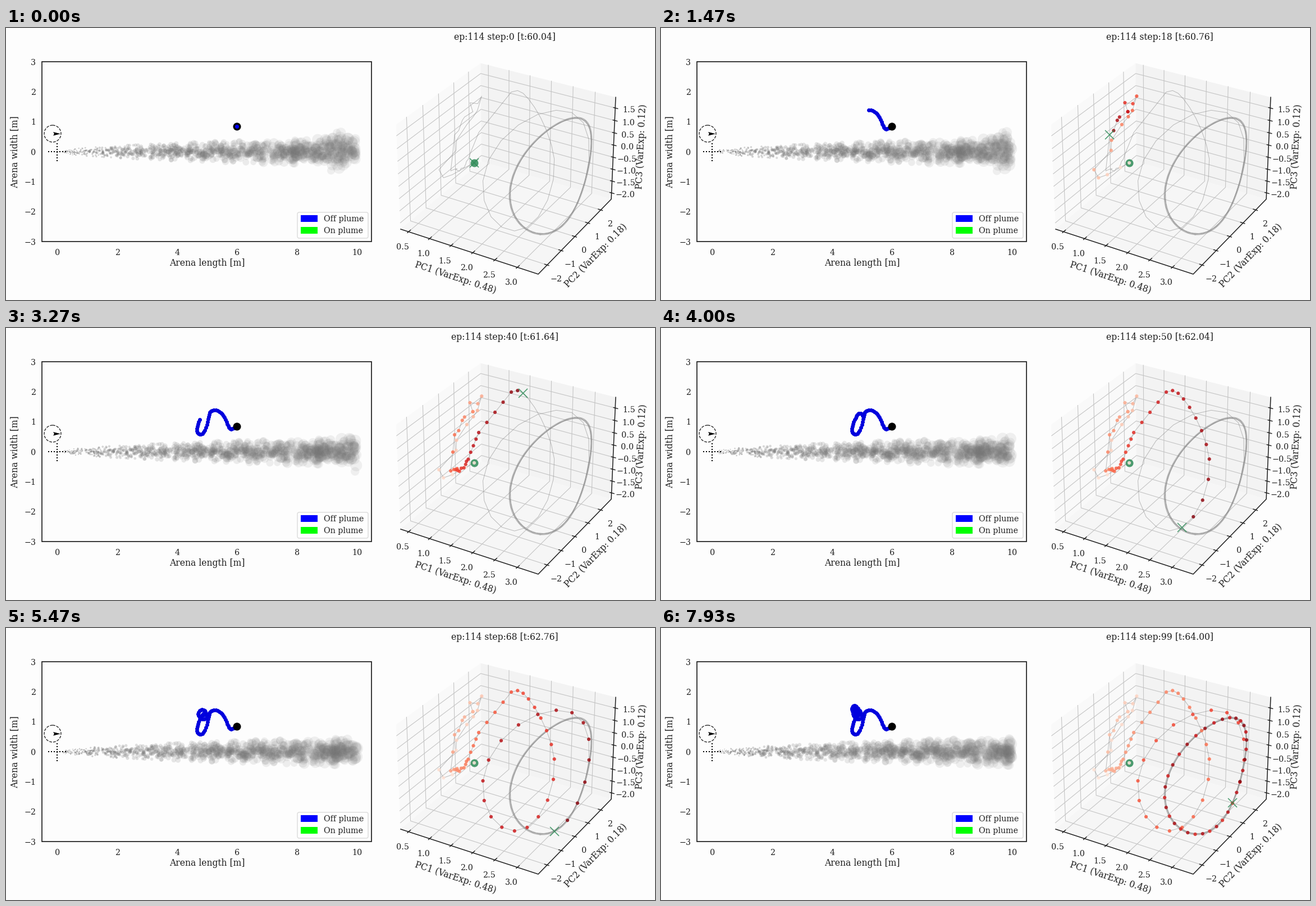
These frames come from a looping animation (1156 px wide and 484 px high, 8000 ms). A matplotlib script:

```python
import numpy as np
import matplotlib.pyplot as plt
from matplotlib.animation import FuncAnimation
from matplotlib.patches import Circle, FancyBboxPatch, Polygon, Rectangle

W, H, DPI = 1156, 484, 64
STEPS, LOOP_MS = 100, 8000
PX = 72 / DPI  # points per pixel
INK, BG, GREEN = "#1c1c1c", "#fdfdfd", "#2e8b57"
TICK, LABEL = 14.2, 15.6

plt.rcParams["font.family"] = "DejaVu Serif"
fig = plt.figure(figsize=(W / DPI, H / DPI), dpi=DPI, facecolor=BG)
ax = fig.add_axes([0, 0, 1, 1])
ax.set_xlim(0, W)
ax.set_ylim(H, 0)
ax.axis("off")


def text(x, y, s, size=TICK, **kw):
    kw = {"ha": "center", "va": "baseline", "color": INK, **kw}
    return ax.text(x, y, s, fontsize=size * PX, **kw)


def line(pts, color=INK, width=1.0, **kw):
    return ax.plot(*np.transpose(pts), color=color, lw=width * PX, **kw)[0]


def area(radius):
    return (2 * np.asarray(radius) * PX) ** 2


def dots(pts, radius, color, **kw):
    x, y = np.transpose(pts) if len(pts) else ([], [])
    return ax.scatter(x, y, s=area(radius), c=color, linewidths=0, **kw)


def ease(t, start, end):
    u = np.clip((t - start) / (end - start), 0, 1)
    return u * u * (3 - 2 * u)


def spline(knots, t):
    """Natural cubic spline through evenly spaced knots."""
    p = np.array(knots, float)
    n = len(p)
    a = 4 * np.eye(n - 2) + np.eye(n - 2, k=1) + np.eye(n - 2, k=-1)
    m = np.zeros_like(p)
    m[1:-1] = np.linalg.solve(a, 6 * (p[2:] - 2 * p[1:-1] + p[:-2]))
    i = np.clip(np.floor(t).astype(int), 0, n - 2)
    f = (t - i)[:, None]
    g = 1 - f
    return g * p[i] + f * p[i + 1] + ((g**3 - g) * m[i] + (f**3 - f) * m[i + 1]) / 6


def signed(v, fmt="{:.1f}"):
    return fmt.format(v).replace("-", "\u2212")


# ---- arena ----
UNIT, X0, Y0 = 53.33, 91.0, 220.3


def draw_arena():
    ax.add_patch(Rectangle((64.3, 60.3), 11 * UNIT, 6 * UNIT, fill=False, ec=INK,
                           lw=1.7 * PX, zorder=6))
    for v in range(0, 11, 2):
        text(X0 + 0.7 + v * UNIT, 404, str(v))
    for v in range(-3, 4):
        text(53, Y0 + 5.5 - v * UNIT, signed(v, "{}"), ha="right")
    text(358, 423, "Arena length [m]", LABEL)
    text(16, 221, "Arena width [m]", LABEL, va="center", rotation=90)

    # wind gauge and odour source
    ax.add_patch(Circle((83, 188), 15, fill=False, ec=INK, lw=1.3 * PX,
                        ls=(0, (3.7, 1.6)), zorder=5))
    ax.add_patch(Polygon([(84, 185), (97, 188.3), (84, 191.6), (86, 188.3)],
                         fc="black", lw=0, zorder=5))
    k = 4.9 * np.arange(-3, 4)
    for x, y in ((X0 + k, Y0 + 0 * k), (X0 + 0 * k, Y0 + 0.7 + k)):
        dots(np.c_[x, y], 1.2, "black", marker="s", zorder=5)

    ax.add_patch(FancyBboxPatch((522, 331), 120, 40, fc="white", ec="#cccccc",
                                boxstyle="round,pad=3,rounding_size=3",
                                lw=1.2 * PX, alpha=0.8, zorder=7))
    for y, color, name in ((333, "blue", "Off plume"), (354, "lime", "On plume")):
        ax.add_patch(Rectangle((525, y), 30, 12, fc=color, lw=0, zorder=8))
        text(566, y + 11, name, ha="left", zorder=8)


# ---- 3D box, one perspective camera over the unit cube ----
ORIGIN = np.array([703, 358, 1])
AXES = np.array([0.9477 * np.array([948, 438, 1]),
                 1.0895 * np.array([847, 237.5, 1]),
                 0.9586 * np.array([695, 172, 1])]) - ORIGIN


def project(*p):
    h = ORIGIN + np.array(p) @ AXES
    return h[:2] / h[2]


def poly(*corners):
    return [project(*c) for c in corners]


def draw_box():
    panes = (("#f9f9f9", poly((0, 0, 0), (0, 1, 0), (0, 1, 1), (0, 0, 1))),
             ("#f3f3f3", poly((0, 1, 0), (1, 1, 0), (1, 1, 1), (0, 1, 1))),
             ("#f6f6f6", poly((0, 0, 0), (1, 0, 0), (1, 1, 0), (0, 1, 0))))
    for color, pts in panes:
        ax.add_patch(Polygon(pts, fc=color, lw=0, zorder=0))

    def grid(*corners):
        line(poly(*corners), "#c4c4c4", 1.1, zorder=1)

    def tick(p, inner, outer):
        line([p + inner, p + outer], INK, 1.4, zorder=3)

    for k in range(6):
        u = 0.060 + 0.159 * k
        grid((u, 0, 0), (u, 1, 0), (u, 1, 1))
        p = project(u, 0, 0)
        tick(p, (3.5, -3), (-2, 1.7))
        text(p[0] - 10.5, p[1] + 31.5, f"{0.5 + 0.5 * k:.1f}")
    for k in range(5):
        v = 0.113 + 0.183 * k
        grid((1, v, 0), (0, v, 0), (0, v, 1))
        p = project(1, v, 0)
        tick(p, (-4.5, -1.4), (3, 1))
        text(p[0] + 16, p[1] + 29, signed(k - 2, "{}"))
    for k in range(8):
        w = 0.0635 + 0.1193 * k
        grid((0, 0, w), (0, 1, w), (1, 1, w))
        p = project(1, 1, w)
        tick(p, (-3, -0.8), (4.5, 1.2))
        text(p[0] + 24.5, p[1] + 8, signed(-2 + 0.5 * k))

    line(poly((0, 0, 0), (1, 0, 0), (1, 1, 0), (1, 1, 1)), INK, 1.5, zorder=3)
    for x, y, angle, s in ((800.5, 444, -18.1, "PC1 (VarExp: 0.48)"),
                           (1051, 405.5, 45.6, "PC2 (VarExp: 0.18)"),
                           (1132, 211, 87.4, "PC3 (VarExp: 0.12)")):
        text(x, y, s, LABEL, va="center", rotation=angle, rotation_mode="anchor")


# ---- trajectories, one point per step ----
def walk_path():
    """A meander, then shrinking loops whose centre drifts up and left."""
    knots = [(411, 175), (399, 179), (391, 163), (380, 149), (365, 148), (359, 167),
             (350, 188), (340, 183), (345, 163), (352, 152), (359, 154)]
    meander = spline(knots, np.arange(49) / 5)
    q = np.arange(STEPS - 49)
    angle = -0.4 + 2 * np.pi * q / 15.8
    r = 8 - 0.08 * q
    loops = np.c_[351 - 0.15 * q + r * np.cos(angle), 156 - 0.3 * q + r * np.sin(angle)]
    return np.vstack([meander, loops])


def orbit(phase, cx=977, cy=263.3, ry=103.7):
    c, s = np.cos(phase), np.sin(phase)
    x = cx - 33.7 * c - 63.9 * s + 8.2 * np.cos(2 * phase) - 3.2 * np.sin(2 * phase)
    return np.c_[x, cy + ry * c - 5.1 * s]


def state_path(rng):
    """A jittery start, a spiral outwards, then a steady limit cycle."""
    keys = np.array([(0, 834, 240), (3, 782, 271), (4, 780, 258), (6, 808, 192),
                     (10, 842, 122), (15, 824, 152), (18, 799, 190), (20, 797, 250),
                     (25, 808, 256), (30, 823, 233), (34, 842, 186), (38, 900, 114)])
    s = np.arange(39)
    start = np.c_[np.interp(s, keys[:, 0], keys[:, 1]),
                  np.interp(s, keys[:, 0], keys[:, 2])]
    wobble = 6 * (1 - ease(s, 14, 24)) + 2 * (1 - ease(s, 26, 32))
    wobble[[0, 18]] = 0
    start += rng.uniform(-1.2, 1.2, start.shape) * wobble[:, None]

    s = np.arange(39, STEPS)
    turns = np.interp(s, [38.8, 46.3, 60.7, 69], [-3, -2.5, -1, 0])
    turns = turns + np.maximum(s - 69, 0) / 8.25
    spiral = orbit(np.pi * turns,
                   867 + 62 * ease(s, 40, 48) + 48 * ease(s, 55, 65),
                   236 + 27.3 * ease(s, 51, 65),
                   125 - 21.3 * ease(s, 52, 65))
    return np.vstack([start, spiral])


# ---- plume puffs drifting downwind ----
rng = np.random.default_rng(114)
N = 1250
puff_x = rng.uniform(-2, 10, N)
puff_z = np.clip(rng.normal(0, 1, N), -2.1, 2.1)
puff_z[(puff_x > 9.1) & (puff_x < 9.7)] *= 1.5  # one gust
puff_k = rng.uniform(0.75, 1.15, N)


def plume_at(step):
    x = puff_x + 0.02 * step
    seen = (x > 0.2) & (x < 10)
    x = x[seen]
    pos = np.c_[X0 + UNIT * x, Y0 - 3.5 * np.sqrt(x) * puff_z[seen]]
    color = np.full((len(x), 4), 0.46)
    color[:, 3] = 0.095 + 0.36 * np.exp(-x / 2.5)
    return pos, (0.6 + 0.95 * x) * puff_k[seen], color


draw_arena()
draw_box()
walk, state = walk_path(), state_path(rng)
reds = plt.get_cmap("Reds")

line(orbit(np.linspace(0, 2 * np.pi, 160)), "#808080", 2.9, alpha=0.5, zorder=2)
line(state, "#808080", 1, alpha=0.5, zorder=2)
dots(state[:1], 7, GREEN, alpha=0.85, zorder=4)
history = dots([], 3.1, "none", zorder=5)
cross = ax.plot([], [], "x", ms=16 * PX, mew=1.6 * PX, color=GREEN, alpha=0.85,
                zorder=6)[0]

plume = dots([], 1, "none", zorder=2)
trail = dots([], 3.5, "#0000dd", zorder=3)
dots(walk[:1], 7, "black", zorder=4)
release = dots(walk[:1], 3.5, "blue", zorder=5)
title = text(888.5, 21, "", LABEL)


def update(s):
    pos, radius, color = plume_at(s)
    plume.set_offsets(pos)
    plume.set_sizes(area(radius))
    plume.set_facecolors(color)

    trail.set_offsets(walk[:s + 1])
    release.set_visible(s == 0)

    history.set_offsets(state[:s])
    history.set_facecolors(reds(0.08 + 0.87 * np.arange(s) / max(s, 1), alpha=0.85))
    cross.set_data(state[s:s + 1, 0], state[s:s + 1, 1])
    title.set_text(f"ep:114 step:{s} [t:{60.04 + 0.04 * s:.2f}]")
    return plume, trail, release, history, cross, title


anim = FuncAnimation(fig, update, frames=STEPS, interval=LOOP_MS / STEPS,
                     repeat=True, repeat_delay=0, blit=False)
plt.show()
```
